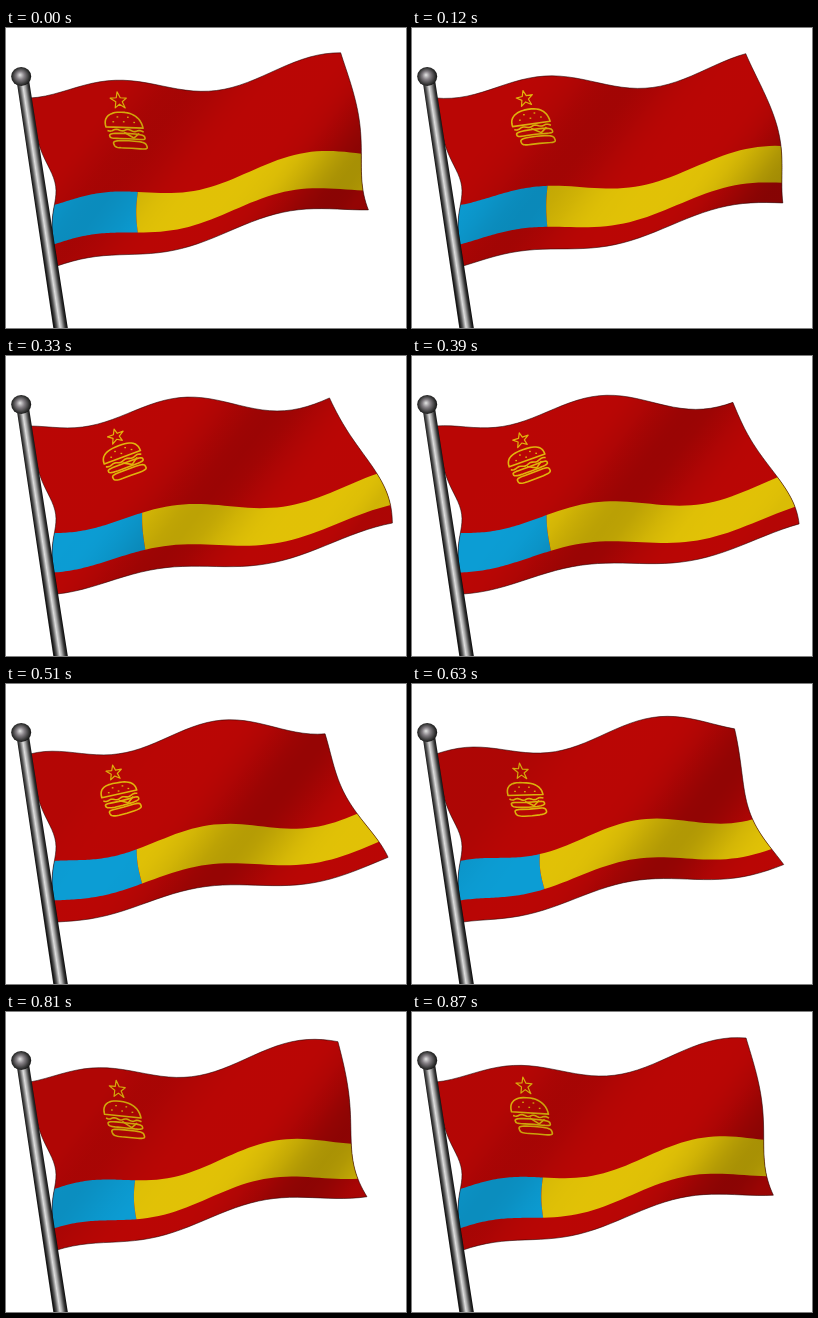
An HTML page with a canvas for the animation above (900 ms loop, 400 by 300 pixels).

```html
<!DOCTYPE html>
<html lang="en">
<head>
<meta charset="utf-8">
<title>Waving flag</title>
<style>
html, body { margin: 0; width: 100%; height: 100%; overflow: hidden; background: #fff; }
canvas { display: block; }
</style>
</head>
<body>
<canvas id="stage" width="400" height="300"></canvas>
<script>
const ctx = document.getElementById('stage').getContext('2d');
const { PI, sin, cos, exp, sign, abs } = Math;
const LOOP = 900, STEP = 30;
const RED = '#bd0605', YELLOW = '#e5c506', BLUE = '#0ca0d8', GOLD = '#e6b80c';

const WAVELENGTH = 0.74;
const BAND_TOP = 0.637, BAND_BOTTOM = 0.872, BLUE_END = 0.272;

// Where the cloth point (u from pole to fly, v from top to bottom) is at time t.
function cloth(u, v, t) {
  const turn = 2 * PI / LOOP;
  const hoist = 24 + 27 * v + 11.5 * exp(-(((v - 0.52) / 0.17) ** 2));
  const sway = 8 + 10 * sin(2.6 * v ** 1.5);
  const fly = 327 + 47 * v + sway * cos(turn * (t - 40 - 340 * v ** 1.2));
  const rest = 70 + 168 * v - (33 + 29 * v) * u;
  const height = (13 - 4 * v) * (1 - exp(-5 * u));
  const phase = 2 * PI * (u - 0.22 + 0.23 * v) / WAVELENGTH - turn * t;
  return [hoist + (fly - hoist) * u, rest - height * cos(phase)];
}

function trace(points, closed = true) {
  ctx.beginPath();
  points.forEach(([x, y]) => ctx.lineTo(x, y));
  if (closed) ctx.closePath();
}

function patch(t, u0, u1, v0, v1) {
  const n = 40, points = [];
  const side = (ua, va, ub, vb) => {
    for (let i = 0; i < n; i++) {
      const s = i / n;
      points.push(cloth(ua + (ub - ua) * s, va + (vb - va) * s, t));
    }
  };
  side(u0, v0, u1, v0);
  side(u1, v0, u1, v1);
  side(u1, v1, u0, v1);
  side(u0, v1, u0, v0);
  trace(points);
}

// Slanted shadows that travel with the crests.
function foldShade(t) {
  const shade = ctx.createLinearGradient(47, 150, 252, 304);
  const crest = 0.17 + WAVELENGTH * t / LOOP;
  for (let i = 0; i <= 32; i++) {
    const s = i / 32;
    const wave = 0.5 + 0.5 * cos(2 * PI * (s - crest) / WAVELENGTH);
    const alpha = 0.02 + (0.07 + 0.2 * s) * wave ** 2;
    shade.addColorStop(s, `rgba(0,0,0,${alpha.toFixed(3)})`);
  }
  return shade;
}

const sample = (n, shape) => Array.from({ length: n }, (_, i) => shape(i));
const soften = (value, power) => sign(value) * abs(value) ** power;
const pill = (y, w, h) => sample(36, i => {
  const a = 2 * PI * i / 36;
  return [w * soften(cos(a), 0.4), y + h * soften(sin(a), 0.6)];
});

// Emblem parts in pixels from the centre of the star.
const star = sample(10, i => {
  const r = i % 2 ? 3.4 : 8.5, a = PI * i / 5;
  return [r * sin(a), -r * cos(a)];
});
const dome = sample(25, i => {
  const a = PI * i / 24;
  return [-18.5 * soften(cos(a), 0.8), 24.5 - 13.5 * sin(a) ** 0.8];
});
const lettuce = sample(25, i => [-18 + 1.5 * i, 28 + 0.8 * sin(i * 0.8)]);
const cheese = [[-2, 30], [6, 35], [13, 30]];
const seeds = sample(5, i => [-10 + 5.2 * i, i % 2 ? 15.5 : 20]);

function drawEmblem(t) {
  const place = ([x, y]) => cloth(0.273 + x / 314, 0.118 + y / 166, t);
  const line = (points, closed) => {
    trace(points.map(place), closed);
    ctx.stroke();
  };
  ctx.strokeStyle = ctx.fillStyle = GOLD;
  ctx.lineJoin = 'round';
  ctx.lineWidth = 1.2;
  line(star);
  ctx.lineWidth = 1.6;
  line(dome);
  line(lettuce, false);
  line(pill(33.5, 17.5, 2.5));
  line(cheese, false);
  line(pill(41.5, 16.5, 3.5));
  for (const seed of seeds) {
    const [x, y] = place(seed);
    ctx.fillRect(x - 0.8, y - 0.6, 1.7, 1.3);
  }
}

function drawFlag(t) {
  const fill = (color, ...area) => {
    patch(t, ...area);
    ctx.fillStyle = color;
    ctx.fill();
  };
  fill(RED, 0, 1, 0, 1);
  fill(BLUE, 0, BLUE_END, BAND_TOP, BAND_BOTTOM);
  fill(YELLOW, BLUE_END, 1, BAND_TOP, BAND_BOTTOM);
  drawEmblem(t);
  fill(foldShade(t), 0, 1, 0, 1);
  ctx.strokeStyle = 'rgba(30,0,0,0.55)';
  ctx.lineWidth = 1;
  ctx.stroke();
}

function tint(gradient, stops) {
  stops.forEach(([at, color]) => gradient.addColorStop(at, color));
  return gradient;
}

function drawPole() {
  trace([[10.5, 52], [23, 52], [61.8, 300], [47.3, 300]]);
  ctx.fillStyle = tint(ctx.createLinearGradient(11, 56, 24, 54),
    [[0, '#151515'], [0.18, '#5a5a5a'], [0.42, '#dedede'], [0.56, '#b0b0b0'], [0.82, '#333'], [1, '#050505']]);
  ctx.fill();

  ctx.beginPath();
  ctx.ellipse(15.2, 48.5, 10, 9.5, 0, 0, 2 * PI);
  ctx.fillStyle = tint(ctx.createRadialGradient(14, 47, 0.5, 15, 48.5, 10.5),
    [[0, '#d8d8d8'], [0.35, '#858085'], [0.75, '#383838'], [1, '#0c0c0c']]);
  ctx.fill();
}

function render(time) {
  const t = Math.floor((time % LOOP) / STEP) * STEP;
  ctx.fillStyle = '#fff';
  ctx.fillRect(0, 0, 400, 300);
  drawFlag(t);
  drawPole();
}

const start = performance.now();
function tick() {
  render(performance.now() - start);
  requestAnimationFrame(tick);
}
tick();
</script>
</body>
</html>
```
